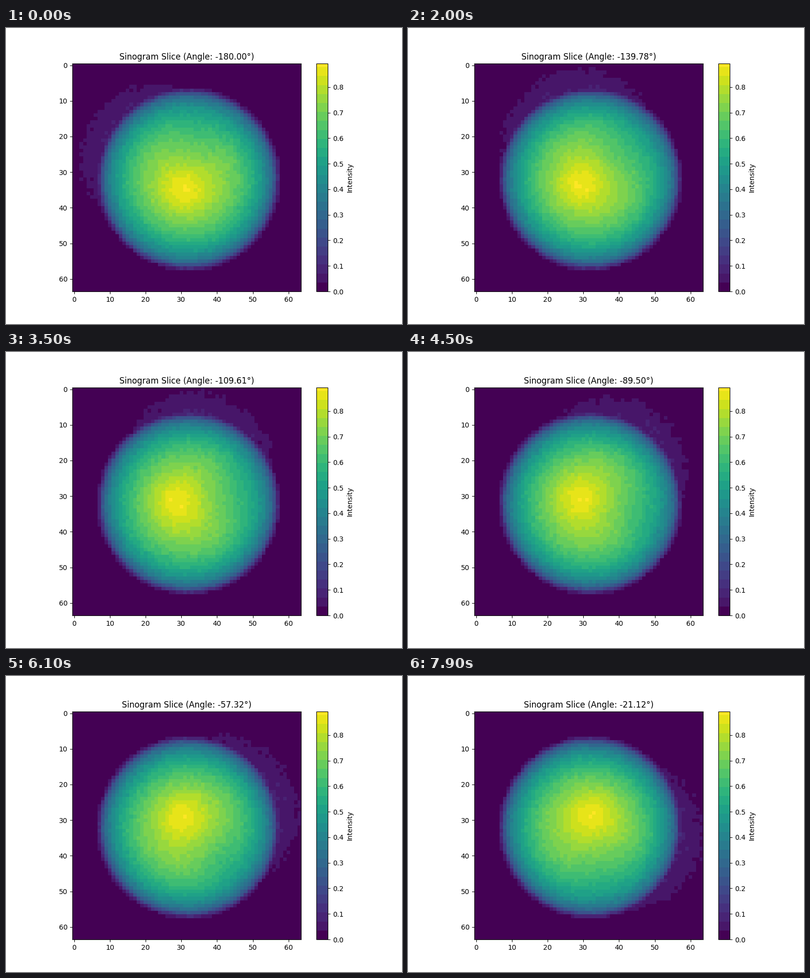
Recreate the animation shown at these times as a matplotlib script. Size 800 by 600 pixels, loop 8000 ms.

```python
import numpy as np
import matplotlib.pyplot as plt
from matplotlib.animation import FuncAnimation
from matplotlib.colors import ListedColormap

N = 64
FRAMES = 80
STEP = 360 / 179
MID = 32
RADIUS = 25.3
VMAX = 0.8927
BANDS = 25.4

dy, dx = np.mgrid[:N, :N] - MID


def stepped_viridis(size=254):
    """Viridis reduced to flat bands, with plain end colours."""
    t = (np.arange(size) + 0.5) / size
    band = np.floor(t * BANDS)
    mid = (band + 0.5) / BANDS
    mid[band == 0] = 0
    mid[band == band.max()] = 1
    return ListedColormap(plt.get_cmap("viridis")(mid))


def chord(d2, radius):
    return np.sqrt(np.clip(radius ** 2 - d2, 0, None))


def soft_disk():
    """Thickness of the ball, averaged over a two-pixel footprint."""
    offsets = np.linspace(-0.9, 0.9, 7)
    return np.mean([chord((dx + a) ** 2 + (dy + b) ** 2, RADIUS)
                    for a in offsets for b in offsets], axis=0)


BALL = 0.0315 * soft_disk()
INSIDE = np.clip(BALL / 0.4, 0, 1)


def projection(i):
    rng = np.random.default_rng(100 + i)
    a = np.radians(i * STEP)
    # coordinates in the frame of the rotating object
    x = dx * np.cos(a) + dy * np.sin(a)
    y = dy * np.cos(a) - dx * np.sin(a)

    def dist2(cx, cy):
        return (x - cx) ** 2 + (y - cy) ** 2

    hot = 0.092 * np.exp(-dist2(-1.5, 3.2) / 42)
    cold = 0.07 * np.exp(-dist2(2, -11) / 72)
    halo = 0.09 / 23 * chord(dist2(-8.6, -5.5), 23)
    field = np.maximum(BALL + INSIDE * (hot - cold), halo)
    noise = rng.normal(0, 0.007, field.shape)
    return field + np.where(field > 0.005, noise, 0)


def title(i):
    return f"Sinogram Slice (Angle: {-180 + i * STEP:.2f}°)"


fig, ax = plt.subplots(figsize=(8, 6), dpi=100)
image = ax.imshow(projection(0), cmap=stepped_viridis(), vmin=0, vmax=VMAX,
                  interpolation="nearest")
heading = ax.set_title(title(0))
fig.colorbar(image, ax=ax, label="Intensity")


def update(i):
    image.set_data(projection(i))
    heading.set_text(title(i))
    return image, heading


anim = FuncAnimation(fig, update, frames=FRAMES, interval=100,
                     repeat=True, repeat_delay=0)
plt.show()
```
